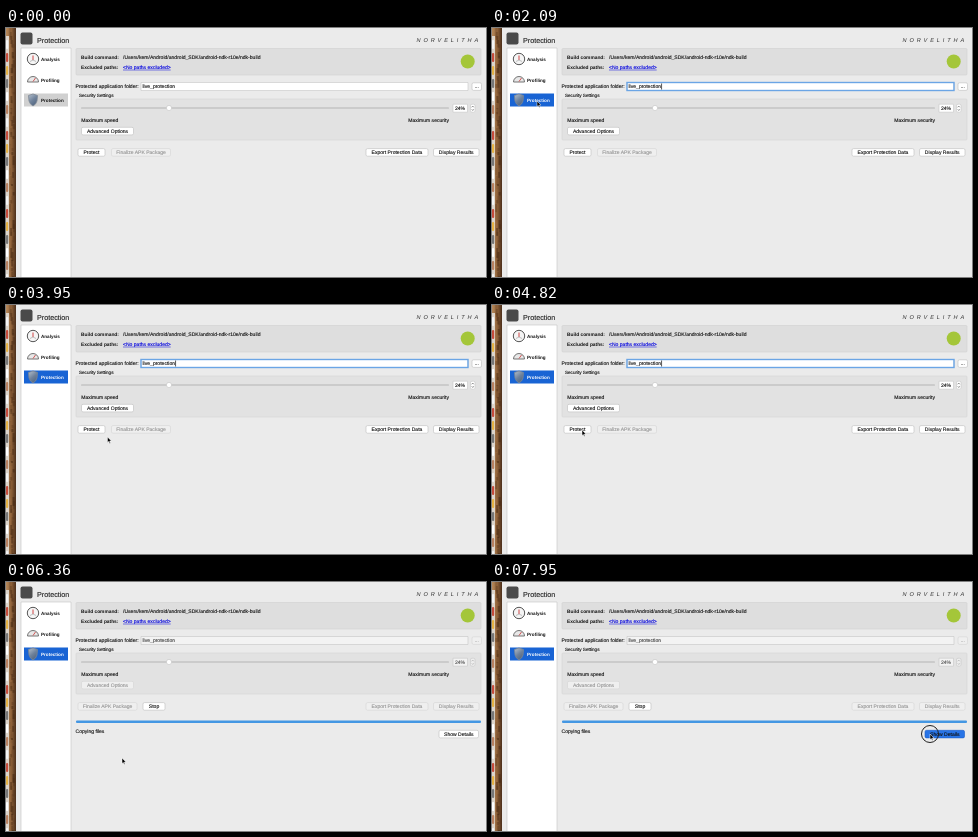
Write an HTML page with a canvas that moves like this. It is 480 px wide and 249 px high and loops after 8 s.

```html
<!DOCTYPE html>
<html lang="en">
<head>
<meta charset="utf-8">
<title>Protection</title>
<style>
  html, body { margin: 0; width: 100%; height: 100%; overflow: hidden; background: #ebebeb; }
  canvas { display: block; width: 100vw; height: 100vh; }
</style>
</head>
<body>
<canvas></canvas>
<script>
const W = 480, H = 249, LOOP = 8000;
const ACTIVATED = 1650, STARTED = 5150;
const CLICKS = [1600, 5020, 7880], CLICK_LENGTH = 260;
const FONT = '"Liberation Sans", Arial, sans-serif';
const canvas = document.querySelector('canvas');
const c = canvas.getContext('2d');

// Pointer tip: time, x, y
const POINTER = [
  [650, 62, 252], [1150, 44, 80], [1320, 44, 80], [1540, 45, 73], [2150, 45, 73],
  [2900, 110, 137], [3500, 110, 137], [4500, 90, 125], [5300, 90, 125],
  [5900, 116, 176], [6650, 116, 176], [7600, 438, 152], [8000, 438, 152]
];

function pointerAt(t) {
  if (t < POINTER[0][0]) return null;
  const i = POINTER.findIndex(p => p[0] > t);
  const [t0, x0, y0] = POINTER[i - 1], [t1, x1, y1] = POINTER[i];
  const u = (t - t0) / (t1 - t0), k = u * u * (3 - 2 * u);
  return [x0 + (x1 - x0) * k, y0 + (y1 - y0) * k];
}

function rect(x, y, w, h, fill, stroke, r = 0) {
  c.beginPath();
  c.roundRect(x, y, w, h, r);
  if (fill) { c.fillStyle = fill; c.fill(); }
  if (stroke) { c.strokeStyle = stroke; c.lineWidth = 0.6; c.stroke(); }
}

function circle(x, y, r, fill, stroke, width = 1) {
  c.beginPath();
  c.arc(x, y, r, 0, Math.PI * 2);
  if (fill) { c.fillStyle = fill; c.fill(); }
  if (stroke) { c.strokeStyle = stroke; c.lineWidth = width; c.stroke(); }
}

function line(points, color, width, fill) {
  c.beginPath();
  points.forEach(([x, y]) => c.lineTo(x, y));
  if (fill) { c.closePath(); c.fillStyle = fill; c.fill(); }
  c.strokeStyle = color;
  c.lineWidth = width;
  c.stroke();
}

function text(s, x, y, { size = 5.06, color = '#111', style = '', align = 'left', spacing = 0 } = {}) {
  c.font = `${style} ${size}px ${FONT}`;
  c.textAlign = align;
  c.letterSpacing = spacing + 'px';
  c.textRendering = 'geometricPrecision';
  c.fillStyle = c.strokeStyle = color;
  c.fillText(s, x, y);
  if (!style) {
    c.lineWidth = 0.12;
    c.strokeText(s, x, y);
  }
  return c.measureText(s).width;
}

function button(label, x, y, w, { disabled = false, pressed = false } = {}) {
  rect(x, y + 0.3, w, 7.6, pressed ? '#2874e6' : disabled ? '#efefef' : '#fff',
    pressed ? '#1c5fc8' : disabled ? '#d4d4d4' : '#bdbdbd', 1.5);
  text(label, x + w / 2, y + 5.8, { align: 'center', color: disabled ? '#959595' : '#111' });
}

function desktop() {
  const wood = c.createLinearGradient(0, 0, 10, 0);
  wood.addColorStop(0, '#b98b5c');
  wood.addColorStop(0.55, '#8d6038');
  wood.addColorStop(1, '#4b2f1b');
  rect(0, 0, 10, H, wood);
  let seed = 7;
  const random = () => (seed = seed * 16807 % 2147483647) / 2147483647;
  for (let y = 0; y < H; y += 4) {
    rect(3 + random() * 4, y, 2, 2 + random() * 8, `rgba(50,25,8,${random() * 0.4})`);
  }
  rect(0, 8, 3, H - 8, '#ddd5cb');
  const colors = ['#f4f4f4', '#c64c3c', '#e6b345', '#777', '#fff', '#b98262'];
  for (let y = 12, i = 0; y < H; y += 13, i++) rect(0, y, 2.2, 9, colors[i % colors.length], null, 1);
}

function sidebar(active) {
  rect(15, 20, 50, H, '#fff', '#c4c4c4');
  rect(18, 65.5, 44, 13, active ? '#1964d4' : '#d0d0d0');

  circle(27, 31, 5.7, '#f5f5f5', '#555', 1);
  line([[27, 27.5], [27, 32]], '#c33', 0.9);
  line([[24, 33.5], [27, 32], [30, 33.5]], '#999', 0.6);

  c.beginPath();
  c.arc(27, 54, 5.5, Math.PI, 0);
  c.closePath();
  c.fillStyle = '#e8e8e8';
  c.fill();
  c.strokeStyle = '#666';
  c.lineWidth = 0.9;
  c.stroke();
  line([[27, 53.5], [29.5, 50]], '#c33', 0.8);

  const shield = c.createLinearGradient(22, 66, 32, 78);
  shield.addColorStop(0, '#b9c4d0');
  shield.addColorStop(0.5, '#6e819a');
  shield.addColorStop(1, '#465a75');
  line([[22.5, 67.5], [27, 66], [31.5, 67.5], [31, 73], [29.5, 76], [27, 78], [24.5, 76], [23, 73], [22.5, 67.5]],
    '#7d8793', 0.8, shield);

  ['Analysis', 'Profiling', 'Protection'].forEach((name, i) =>
    text(name, 35, 33 + i * 20.5, { size: 4.6, style: 'bold', color: active && i === 2 ? '#fff' : '#111' }));
}

function header() {
  rect(10, 0, W - 10, H, '#ebebeb');
  rect(14.5, 4.5, 12, 12, '#4a4a4a', null, 2);
  text('Protection', 31, 14.6, { size: 7.2, color: '#222' });
  text('NORVELITHA', 410.5, 13.6, { size: 5.6, style: 'italic', color: '#333', spacing: 2.9 });
}

function buildPanel() {
  rect(70, 20.5, 405, 26.5, '#dedede', '#d0d0d0', 1);
  text('Build command:', 75, 31, { size: 4.85, style: 'bold' });
  text('/Users/kem/Android/android_SDK/android-ndk-r10e/ndk-build', 117, 31);
  text('Excluded paths:', 75, 41, { size: 4.85, style: 'bold' });
  const width = text('<No paths excluded>', 117, 41, { color: '#0000e0' });
  rect(117, 41.7, width, 0.5, '#0000e0');
  circle(461.7, 33.5, 7, '#a4c639');
}

function settings(t, focused, running) {
  text('Protected application folder:', 69.5, 60, { size: 5.1 });
  rect(135, 54.5, 327, 8, running ? '#f3f3f3' : '#fff', '#c6c6c6');
  if (focused) {
    c.strokeStyle = '#6ba5e5';
    c.lineWidth = 1.4;
    c.strokeRect(135, 54.5, 327, 8);
  }
  const width = text('live_protection', 136.5, 60.2, { color: running ? '#444' : '#111' });
  if (focused && (t - ACTIVATED) % 1000 < 500) rect(136.8 + width, 55.6, 0.7, 6, '#111');
  button('...', 466, 54.5, 9.5, { disabled: running });

  rect(70, 71, 405, 41, '#e2e2e2', '#d5d5d5', 1);
  text('Security Settings', 73, 69.2, { size: 4.6 });
  rect(75, 79.4, 368, 1.2, '#b5b5b5', null, 0.5);
  circle(163, 80, 2.6, '#fff', '#bbb', 0.5);
  rect(447, 76.2, 14.5, 8, running ? '#f3f3f3' : '#fff', '#c6c6c6');
  text('24%', 449, 82.2, { color: running ? '#555' : '#111' });
  rect(464.5, 76.2, 4.5, 8, running ? '#eee' : '#fff', '#c6c6c6', 1.5);
  const arrow = running ? '#aaa' : '#555';
  line([[465.7, 79.3], [466.75, 78], [467.8, 79.3]], arrow, 0.6);
  line([[465.7, 81.2], [466.75, 82.5], [467.8, 81.2]], arrow, 0.6);
  text('Maximum speed', 75.3, 94);
  text('Maximum security', 443, 94, { align: 'right' });
  button('Advanced Options', 75.5, 99, 52, { disabled: running });
}

function actions(t, running) {
  if (running) {
    button('Finalize APK Package', 72, 120.3, 59, { disabled: true });
    button('Stop', 137, 120.3, 22);
    rect(70, 138.6, 405, 2.5, '#4497e3', null, 1);
    text('Copying files', 69.5, 151.3);
    button('Show Details', 433, 148, 39.5, { pressed: t >= CLICKS[2] });
  } else {
    button('Protect', 72, 120.3, 27, { pressed: t >= CLICKS[1] });
    button('Finalize APK Package', 105.5, 120.3, 59, { disabled: true });
  }
  button('Export Protection Data', 360, 120.3, 62, { disabled: running });
  button('Display Results', 427.5, 120.3, 45.5, { disabled: running });
}

function pointer(t) {
  const tip = pointerAt(t);
  if (!tip) return;
  const [x, y] = tip;
  if (CLICKS.some(start => t >= start && t < start + CLICK_LENGTH)) circle(x, y, 8.5, null, '#222', 1);
  const shape = [[0, 0], [0, 5.6], [1.3, 4.5], [2.2, 6.5], [3, 6.1], [2.2, 4.2], [3.9, 4], [0, 0]];
  line(shape.map(([dx, dy]) => [x + dx, y + dy]), '#fff', 0.5, '#000');
}

function draw(t) {
  const running = t >= STARTED, active = t >= ACTIVATED;
  desktop();
  header();
  sidebar(active);
  buildPanel();
  settings(t, active && !running, running);
  actions(t, running);
  pointer(t);
}

function frame() {
  const w = Math.round(innerWidth * devicePixelRatio), h = Math.round(innerHeight * devicePixelRatio);
  if (canvas.width !== w || canvas.height !== h) {
    canvas.width = w;
    canvas.height = h;
  }
  c.setTransform(w / W, 0, 0, h / H, 0, 0);
  draw(performance.now() % LOOP);
  requestAnimationFrame(frame);
}
frame();
</script>
</body>
</html>
```
